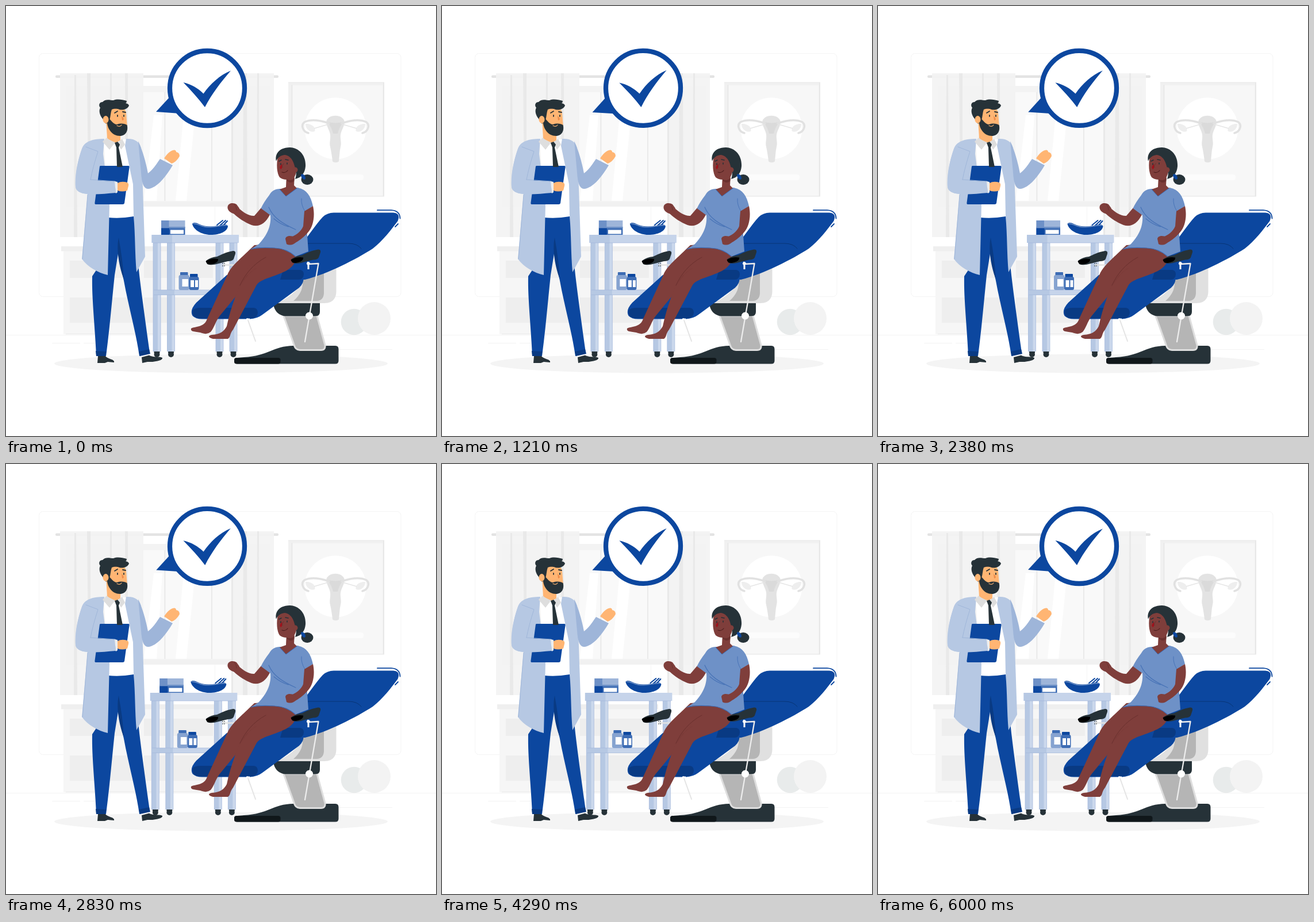
Animation of 748 by 748 pixels, one loop 6.04 s. Source, as an HTML page:

```html
<!DOCTYPE html>
<html lang="en">
<head>
<meta charset="utf-8">
<title>Check-up</title>
<style>
  html, body { margin: 0; width: 100%; height: 100%; overflow: hidden; background: #fff; }
  svg { display: block; width: 100%; height: 100%; }
  .blue { fill: #0c479f; }
  .navy { fill: #093a83; }
  .dark { fill: #263238; }
  .coat { fill: #b6c8e3; }
  .skin { fill: #ffb573; }
  .brown { fill: #7f3e3b; }
  .gown { fill: #6e91c7; }
  .line { fill: none; stroke-linecap: round; stroke-linejoin: round; }
</style>
</head>
<body>
<svg viewBox="0 0 748 748">
  <!-- room -->
  <g>
    <rect x="57.5" y="82.5" width="629.5" height="423" rx="7" fill="none" stroke="#f4f4f4"/>
    <path d="M0 572.5H748M80 586.500H129M135 586.500H155M575 597.500H672" stroke="#f3f3f3" fill="none"/>
    <rect x="104" y="139" width="356" height="210" fill="#f3f3f3"/>
    <path d="M112 150H275V339H112ZM277 150H357V339H277ZM359 150H452V339H359Z" fill="#f9f9f9"/>
    <path d="M257 190L272 190 262 339H240ZM309 190H329L314 339H295Z" fill="#fff"/>
    <path d="M276.500 150V339M358 150V339" stroke="#e8e8e8" stroke-width="1.500"/>
    <path d="M104 349H460V341H104Z" fill="#f1f1f1"/>
    <path d="M363.500 349V398" stroke="#f5f5f5"/>
    <rect x="86" y="120.500" width="388" height="4.500" rx="2" fill="#e3e3e3"/>
    <path d="M94 117H239V402H94ZM392 117H466V402H392Z" fill="#f4f4f4" opacity=".92"/>
    <path d="M119 120H122L124 402H118ZM141 117H147V402H144ZM181 117H184V402H180ZM207 117H212V402H208ZM392 117H395V402H392ZM413 117H419L420 402H412ZM437 117H440V402H436Z" fill="#e9e9e9"/>
    <rect x="100" y="426" width="272" height="145" fill="#f6f6f6"/>
    <rect x="96" y="418" width="280" height="8.500" fill="#efefef"/>
    <path d="M111 443H228V473H111ZM240 443H360V473H240ZM111 507H228V551H111ZM240 507H360V551H240Z" fill="#eee"/>
    <path d="M104 570.500H372" stroke="#ececec" stroke-width="1.500"/>
    <ellipse cx="374" cy="622" rx="290" ry="16.500" fill="#f4f4f4"/>
    <circle cx="605.500" cy="549.500" r="22.800" fill="#e8ebeb"/>
    <circle cx="640.500" cy="543.500" r="28.500" fill="#f3f3f3"/>
  </g>

  <!-- poster -->
  <g>
    <rect x="491" y="132.500" width="167" height="199" fill="#e8e8e8"/>
    <rect x="491" y="133.500" width="165" height="197" fill="#f1f1f1"/>
    <rect x="498" y="138" width="157" height="192" fill="#f7f7f7"/>
    <path d="M497.500 137V330" stroke="#e6e6e6" stroke-width="1.500"/>
    <circle cx="573" cy="213" r="53.500" fill="#fff"/>
    <path d="M557 202C559 187 587 187 589 202C588 211 583 216 582 224C581 232 584 237 582 245C580 254 580 262 579 270C577 273 570 273 568 270C567 262 566 254 564 245C562 237 565 232 564 224C563 216 558 211 557 202Z" fill="#e3e3e3"/>
    <path d="M559 201Q573 206 587 201Q579 212 577 222H569Q567 212 559 201Z" fill="#dadada"/>
    <g id="tube">
      <path d="M562 204C547 199 531 196 519 202C512 208 517 219 526 221" class="line" stroke="#e1e1e1" stroke-width="3.500"/>
      <path d="M521 205C531 204 540 211 537 218C530 221 521 215 521 205Z" fill="#eee"/>
      <path d="M536 213L560 206" stroke="#e6e6e6" stroke-width="1.500"/>
    </g>
    <use href="#tube" transform="matrix(-1 0 0 1 1146 0)"/>
    <rect x="525" y="293" width="97" height="10" rx="4" fill="#fcfcfc"/>
  </g>

  <!-- trolley -->
  <g id="cart">
    <g id="legs"></g>
    <rect x="257" y="494" width="145" height="8.500" fill="#c6d4ea"/>
    <rect x="257" y="494" width="36" height="8.500" class="coat"/>
    <path d="M257 494H402M257 502.500H402" stroke="#a2b7da" stroke-width=".7"/>
    <rect x="253.500" y="398" width="151.500" height="14" fill="#c6d4ea"/>
    <rect x="253.500" y="398" width="35.500" height="14" class="coat"/>
    <path d="M256 412H403" stroke="#a2b7da" stroke-width=".7"/>
    <rect x="270" y="373" width="41.500" height="11" fill="#9eb5d9"/>
    <rect x="270" y="373" width="13.500" height="11" class="gown"/>
    <rect x="270" y="384" width="41.500" height="14" fill="#3d6cb4"/>
    <rect x="270" y="384" width="41.500" height="2.500" class="gown"/>
    <rect x="270" y="386.500" width="14" height="11.500" class="blue"/>
    <rect x="286" y="389.500" width="23" height="7" fill="#fff"/>
    <path d="M367 381L377 373M372 382L382 373M376 384L385 374" class="line" stroke="#0c479f" stroke-width="2"/>
    <path d="M324 379C326 376 331 377 335 379C346 385 364 384 374 381C380 379 385 380 386 383C385 392 373 398 356 398C340 398 326 389 324 379Z" class="blue"/>
    <path d="M326 378.500C334 378 339 384 350 384.500C363 385 374 381 384 381.500" class="line" stroke="#6e91c7" stroke-width="1.600"/>
    <g>
      <rect x="303" y="463" width="13.500" height="6" rx="1" fill="#3d6cb4"/>
      <rect x="300.500" y="468" width="18.500" height="26" rx="3" fill="#86a3d0"/>
      <rect x="306.500" y="475" width="10.500" height="13" fill="#fff"/>
      <rect x="320" y="466" width="13.500" height="6" rx="1" class="blue"/>
      <rect x="318.500" y="471" width="17" height="23" rx="3" fill="#3d6cb4"/>
      <path d="M321 477H327V489H321ZM329 477H334V489H329Z" fill="#fff"/>
    </g>
  </g>

  <!-- chair -->
  <g>
    <path d="M397 618V616Q397 612 402 612L414 611C456 609 464 591.500 500 591H573Q578.500 591 578.500 597V617Q578.500 622.500 573 622.500H402Q397 622 397 618Z" class="dark"/>
    <rect x="397" y="612" width="80.500" height="10.500" rx="4" fill="#10171a"/>
    <path d="M483 539H541L555 590Q556 598.500 548 598.500H512Q504 598 502 592Z" fill="#b5b5b5" stroke="#dedede" stroke-width="3"/>
    <path d="M470 517Q495 508 514 484V440H574.500V497Q574 517 553 517Z" fill="#e0e0e0"/>
    <path d="M516 440H553V500Q552 513 540 513H500Q515 500 516 484Z" fill="#b5b5b5"/>
    <path d="M466 517H546V532Q546 539.500 538 539.500H485Q470 537 466 523Z" class="dark"/>
    <path d="M500 430C520 410 536 383 551 367Q559 359.500 570 359.500H674Q687 360.500 681.500 374C671 388 655 409 638 422C610 440 560 466 520 476H480Z" class="blue"/>
    <path d="M525 413H596Q611 413 618 422" class="line" stroke="#083576" stroke-width="1"/>
    <path d="M646 355.200H670Q685 356 685.500 369.500M677 384L682 379" class="line" stroke="#0c479f" stroke-width="1.800"/>
    <path d="M384 468L331 516Q319 529 324.500 539Q330 544.500 341 544.500H424Q437 544 446 537L510 490Q520 481 517 468L516 455H440Z" class="blue"/>
    <path d="M325 529Q329 525 338 525H430Q438 525 438 534Q437 543 426 543.500H339Q322 543 325 529Z" class="navy"/>
    <path d="M482 459H512Q518 460 518 467Q517 476 509 476H477Z" class="navy"/>
    <path d="M420 544L434 583" class="line" stroke="#e4e4e4" stroke-width="2"/>
    <path d="M418 545H424" stroke="#fff" stroke-width="3"/>
    <path d="M377 450.500H401" stroke="#e3e3e3" stroke-width="2.500"/>
    <path d="M377 447V454M380 447V454" stroke="#263238" stroke-dasharray="2 2"/>
  </g>

  <!-- patient -->
  <g>
    <path d="M432 416C411 437 391 452 385 468L350 544C345 560 328 557 322 561C320 568 333 566 341 569Q350 572 356 567C362 560 364 550 371 540L431 467 460 414Z" class="brown"/>
    <path d="M440 414H502C510 434 505 450 490 459C470 471 441 474 435 487L395 563C389 570 391 576 386 579H360C351 577 351 573 358 572C373 571 379 566 384 557C390 528 401 498 411 477C416 462 426 446 438 432Z" class="brown"/>
    <path d="M452 437C430 449 416 466 407 486" class="line" stroke="#6a302e" stroke-width="1"/>
    <path d="M437 455C423 463 415 474 409 485Q417 467 437 455Z" fill="#6a302e"/>
    <path d="M444 351L459 363C451 379 440 385 427 381C415 376 404 369 396 361L404 351C414 360 424 366 432 365Z" class="brown"/>
    <path d="M385.500 349C387 342 396 341.500 401 345L406 352 398 362C390 360 384.500 355 385.500 349Z" class="brown"/>
    <path d="M397 345Q401 349 401 355" class="line" stroke="#6a302e"/>
    <path d="M477 318C467 318 462 322 458 329C452 337 447 344 443.500 352L460 364C462 387 450 403 440 414L426 423C438 419 452 420 468 421Q489 422 503 436L526 427 521 357 534 348C530 330 523 319 507 316Z" class="gown"/>
    <path d="M426 423C440 419 455 420 468 421Q488 422 503 435" class="line" stroke="#3d6cb4" stroke-width="1.200"/>
    <path d="M457 350C465 369 482 379 504 389M466 370C474 377 482 381 491 384" class="line" stroke="#4974b7" stroke-width="1.300"/>
    <path d="M520 357Q513 346 514 335" class="line" stroke="#4974b7"/>
    <path d="M519 357L534 348C538 366 534 384 526 393C519 402 508 410 500 413L496 402C507 397 514 391 517 383Z" class="brown"/>
    <path d="M486 405C487 399 496 399 502 402L506 409C501 416 493 417 488 414Z" class="brown"/>
    <path d="M488 294L487 315 476 319 487 331 506 317 501 312 502 292Z" class="brown"/>
    <path d="M476 319L487 331 506 317" class="line" stroke="#3d6cb4"/>
    <path d="M488 301Q495 306 502 299L501 305Q494 310 488 303Z" fill="#6a302e"/>
    <ellipse cx="524" cy="302" rx="10.500" ry="9" class="dark"/>
    <path d="M473 262C470 275 471 291 476 298C483 304 495 303 502 297C508 286 506 270 498 260C490 255 479 256 473 262Z" class="brown"/>
    <path d="M470 270C467 259 474 246 494 246C512 247 522 262 521 279C520 291 513 299 503 301C507 290 503 283 501 275C498 265 492 260 485 259C477 260 472 264 470 270Z" class="dark"/>
    <circle cx="503" cy="285" r="4.500" class="brown"/>
    <ellipse cx="517" cy="297" rx="3" ry="5.500" transform="rotate(-35 517 297)" class="blue"/>
    <path d="M478 274V276M489 273V275M475 270L479 268M486 267L491 268" class="line" stroke="#263238" stroke-width="1.600"/>
    <path d="M480 275Q474 280 478 284L480 282Z" fill="#a1111b"/>
    <path d="M480 289Q486 291 490 286" class="line" stroke="#4d1e1d" stroke-width="1.200"/>
    <path d="M483 274Q479 279 481 281" class="line" stroke="#6a302e"/>
  </g>

  <!-- stirrups and crank -->
  <g>
    <path d="M526 452L525 446M525 449L543.500 448 520 584" class="line" stroke="#ececec" stroke-width="2.300"/>
    <path d="M526 445V458M523 448H529" stroke="#fff" stroke-width="3"/>
    <circle cx="527.500" cy="539" r="6.500" fill="#fff"/>
    <g id="pad">
      <path d="M348 443Q356 437 367 436C374 433 382 428 395 426Q400 426 399 431L396 440Q394 444 386 444L370 448Q357 452 350 449Z" class="dark"/>
      <path d="M347.500 444Q357 438 369 440Q370 447 356 449.500Q349 450 347.500 444Z" fill="#000"/>
    </g>
    <use href="#pad" x="148" y="-2.500"/>
  </g>

  <!-- doctor -->
  <g>
    <path d="M178 364L223 364C227 405 229 440 232 468C237 510 244 560 250 603L232 609C226 567 213 522 205 478L195 431 189 468C184 516 180 563 174 609H157C155 560 149 510 150 470L170 440Z" class="blue"/>
    <path d="M196 403C191 425 198 458 205 475Q203 441 196 403Z" class="navy"/>
    <path d="M156 600L174.500 601 173 609H157ZM231 601L249 597 251 605 233 609Z" class="navy"/>
    <path d="M160 609H173C177 614 186 614 188 618V620L177 619 172 621H159Z" class="dark"/>
    <path d="M236 611L249 607.500C256 612 267 609 272 612C273 616 263 618 255 619L246 619 237 621Z" class="dark"/>
    <path d="M170 232H209L223 300 222 366Q200 370 178 368Z" fill="#fff"/>
    <path d="M209 231C224 230 232 236 235 247L238 318 242 436 227 463C224 430 225 398 222 366L221 310 207 243Z" class="coat"/>
    <path d="M230 235C238 252 244 275 247 291C256 285 262 274 268 266L290 277C277 299 261 318 246 318C239 317 236 307 235 290Z" fill="#9eb5d9"/>
    <path d="M275 265C279 259 285 251 293 250.500Q296 251 296 254Q302 255 302 261C298 269 292 273 288 274Z" class="skin"/>
    <path d="M171 231C152 231 138 235 133 246C126 264 120 293 121 315Q123 326 142 327L132 440C142 454 160 464 177 468L180 345 169 257Z" class="coat"/>
    <path d="M163 279Q163 278 165 278H213Q215 278 214.500 281L206 343Q205.500 345 203 345H156Q154 345 154.500 342Z" class="blue"/>
    <path d="M133 246C126 264 119 293 121 315C124 331 157 328 191 325L190 305 152 303 160 255Z" class="coat"/>
    <path d="M139 245L160 253Q151 281 147 302M147 302L190 305M142 328L133 440" class="line" stroke="#9eb5d9" stroke-width=".9"/>
    <path d="M189 305L194 306V324L191 326Z" fill="#eee"/>
    <path d="M194 308Q201 304 211 307Q214 309 213 313L211 321Q202 324 194 321Z" class="skin"/>
    <path d="M174 196L176 231 190 238 199 234V218Z" class="skin"/>
    <path d="M168 236L175 229Q182 235 190 237L180 250ZM194 237L202 231 207 241 200 250Z" fill="#dedede"/>
    <path d="M189 238L194 236 198 241 196 246 203 280H193L192 246Z" class="dark"/>
    <path d="M178 181C190 172 208 174 209 186L211 212Q202 222 187 214L177 203Z" class="skin"/>
    <path d="M176 192C183 199 187 206 193 206C201 203 207 205 210.500 207C213 216 209 226 198 226C185 226 177 214 176 204Z" class="dark"/>
    <path d="M168 196C163 190 161 182 164 177C160 172 163 167 168 167C173 161 181 164 187 164C194 161 202 163 210 165Q210 168 208 169Q213 170 214 173C212 179 204 182 197 180C192 178 187 179 184 180C182 185 182 192 180 199L174 205Z" class="dark"/>
    <ellipse cx="173.500" cy="197.500" rx="5" ry="6.500" class="skin"/>
    <path d="M194 190V192M205 190V192M189 186L194 183M203 184L208 185" class="line" stroke="#263238" stroke-width="1.800"/>
    <path d="M201 191Q208 198 202 199Z" fill="#ed8b4a"/>
    <path d="M193 208Q198 211 201 207" class="line" stroke="#ffb573" stroke-width="1.200"/>
  </g>

  <!-- speech bubble -->
  <g id="bubble">
    <path d="M261 184L285 158 303 187Z" class="blue"/>
    <circle cx="350" cy="143" r="65" fill="#fff" stroke="#0c479f" stroke-width="8.300"/>
    <path d="M308.500 133C322 136 334 143 343.500 152.500C355 136 372 120 391 112.500C374 132 358 153 346 176C335 161 322 147 308.500 133Z" class="blue"/>
  </g>
</svg>
<script>
  const byId = id => document.getElementById(id);
  const LOOP = 6040, FPS = 24, LAST = 144;

  byId('legs').innerHTML = [256, 280.5, 365, 389].map(x => `
    <circle cx="${x + 6.5}" cy="606" r="5" class="dark"/>
    <rect x="${x + 1.5}" y="600.5" width="10" height="3.5" rx="1" class="dark"/>
    <rect x="${x}" y="412" width="13" height="189" fill="#cbd8ec"/>
    <rect x="${x}" y="412" width="8" height="189" class="coat"/>
    <path d="M${x} 412V601M${x + 13} 412V601" stroke="#a2b7da" stroke-width=".7"/>`).join('');

  // [progress, value]
  const shake = [[0, 0], [.1, -1], [.2, 2], [.3, -4], [.4, 4], [.5, -4],
                 [.6, 4], [.7, -4], [.8, 2], [.9, -1], [1, 0]];
  const sway = [[0, 0], [.25, 1], [.75, -1], [1, 0]];
  const UNIT = 748 / 500;

  function at(steps, p) {
    const i = Math.max(1, steps.findIndex(s => s[0] >= p));
    const [p0, a] = steps[i - 1], [p1, b] = steps[i];
    return a + (b - a) * (p - p0) / (p1 - p0);
  }

  function draw() {
    const ms = performance.now() % LOOP;
    const sec = Math.min(LAST, Math.floor((ms + 4.9) * FPS / 1000)) / FPS;
    const slide = at(shake, sec / 6 % 1) * UNIT;
    const tilt = at(sway, sec / 1.5 % 1);
    byId('cart').setAttribute('transform', `translate(${slide.toFixed(3)} 0)`);
    byId('bubble').setAttribute('transform', `rotate(${tilt.toFixed(3)} 340 143)`);
    requestAnimationFrame(draw);
  }
  draw();
</script>
</body>
</html>
```
